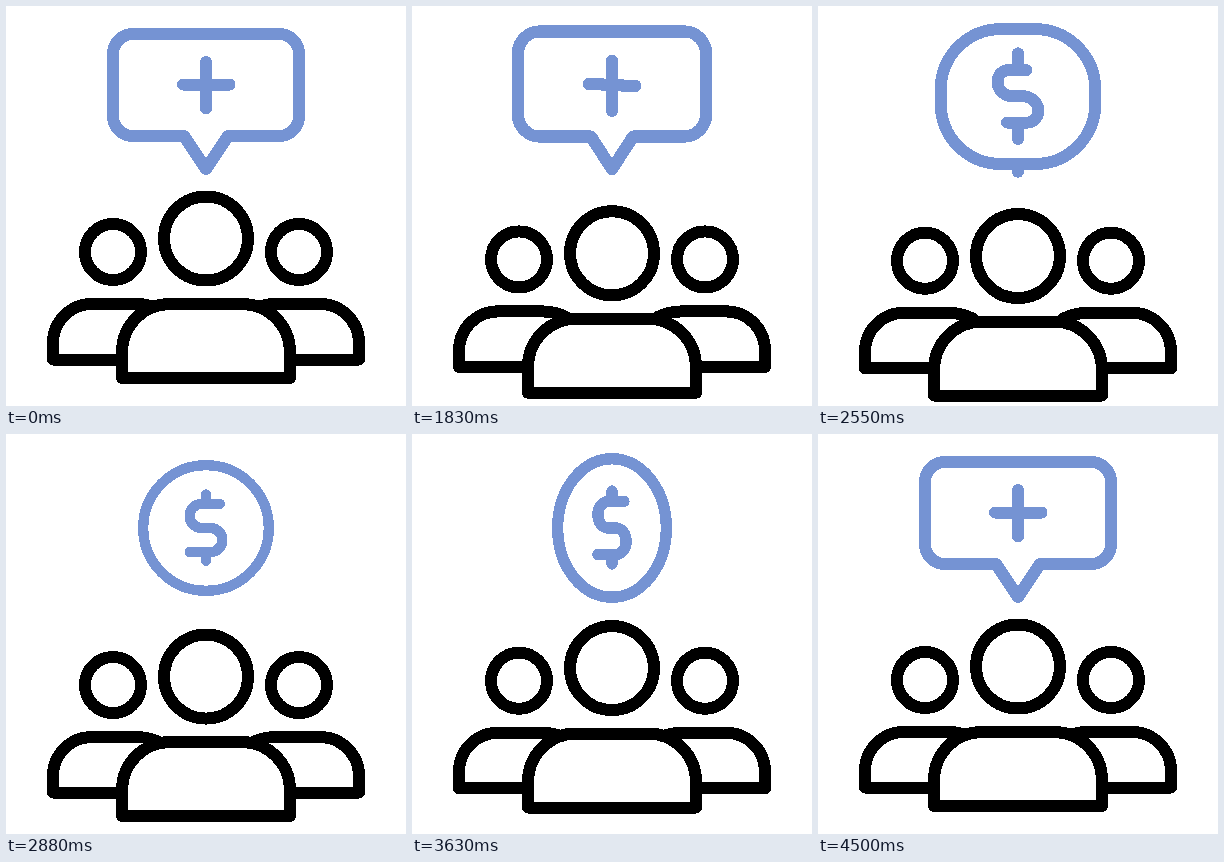
Write an HTML page that moves like this. It is 400 px wide and 400 px high and loops after 4.53 s.

```html
<!DOCTYPE html>
<html lang="en">
<head>
<meta charset="utf-8">
<title>Group idea</title>
<style>
  html, body { margin: 0; width: 100%; height: 100%; overflow: hidden; background: #fff; }
  svg { display: block; width: 100vw; height: 100vh; }
  g { stroke-linecap: round; stroke-linejoin: round; shape-rendering: crispEdges; }
</style>
</head>
<body>
<svg viewBox="0 0 400 400" stroke-width="12">
  <g id="sides" fill="none" stroke="#000">
    <g id="side">
      <circle cx="107" cy="246" r="28"/>
      <path d="M116 353.5H47V337A39 39 0 0 1 86 298H130Q143 298 155 304"/>
    </g>
    <use href="#side" transform="matrix(-1 0 0 1 400 0)"/>
  </g>
  <g id="middle" fill="#fff" stroke="#000">
    <circle cx="200" cy="232.5" r="42"/>
    <path d="M116 372V346A48 48 0 0 1 164 298H236A48 48 0 0 1 284 346V372Z"/>
  </g>
  <g id="sign" fill="none" stroke="#7593d3">
    <path id="frame"/>
    <path id="bar"/>
    <path id="stem"/>
  </g>
</svg>
<script>
const LOOP = 4530, STEP = 30;
const CX = 200, COIN_Y = 94, COIN_R = 73, TIP_Y = 163;
const byId = id => document.getElementById(id);
const mix = (a, b, p) => a + (b - a) * p;
const phase = (t, from, to) => Math.min(1, Math.max(0, (t - from) / (to - from)));
const smooth = u => u * u * (3 - 2 * u);
const easeOut = u => 1 - (1 - u) ** 3;
const hump = (t, from, to) => Math.sin(Math.PI * phase(t, from, to)) ** 2;

// People sink quickly, then rise back slowly.
const drop = t => 21 * (easeOut(phase(t, 1530, 2430)) - easeOut(phase(t, 2430, 4500)));

const zoom = t => 1 - .1 * hump(t, 1500, 1700) + .075 * hump(t, 1700, 2500)
  - .14 * hump(t, 2500, 3260) - .08 * hump(t, 3300, 4410);

// 0 is the bubble with a plus, 1 the coin with a dollar sign.
const morph = t => t > 1500 ? mix(.03, 1, phase(t, 1500, 2600) ** 6) : 0;

const turn = t => smooth(phase(t, 3300, 4410));

// Points along the dollar curve, matched to points along the plus bar.
const COUNT = 60;
const curve = document.createElementNS("http://www.w3.org/2000/svg", "path");
curve.setAttribute("d", "M216 66H195A14 14 0 0 0 195 94H205A14 14 0 0 1 205 122H181");
const dollar = Array.from({ length: COUNT + 1 }, (_, i) =>
  curve.getPointAtLength(curve.getTotalLength() * i / COUNT));

// Maps a point after scaling around (CX, pivot).
const placer = (sx, sy, pivot) => (x, y) =>
  `${(CX + (x - CX) * sx).toFixed(2)} ${(pivot + (y - pivot) * sy).toFixed(2)}`;

function framePath(p, sx, sy) {
  const at = placer(sx, sy, mix(TIP_Y, COIN_Y, p));
  const half = mix(93, COIN_R, p), r = mix(20, COIN_R, p);
  const top = mix(28, COIN_Y - COIN_R, p), bottom = mix(130, COIN_Y + COIN_R, p);
  const tail = 22 * (1 - p) ** 2, tip = mix(TIP_Y, COIN_Y + COIN_R, p);
  const left = CX - half, right = CX + half;
  const arc = (x, y) => `A${r * sx} ${r * sy} 0 0 1 ${at(x, y)}`;
  return `M${at(CX, tip)}L${at(CX - tail, bottom)}L${at(left + r, bottom)}`
    + arc(left, bottom - r) + `L${at(left, top + r)}` + arc(left + r, top)
    + `L${at(right - r, top)}` + arc(right, top + r)
    + `L${at(right, bottom - r)}` + arc(right - r, bottom)
    + `L${at(CX + tail, bottom)}Z`;
}

function drawSymbol(p, sx, sy) {
  const swell = 1 + 1.3 * p * (1 - p);
  const at = placer(sx * swell, sy * swell, mix(79, COIN_Y, p));
  const points = dollar.map(({ x, y }, i) =>
    at(mix(mix(177, 223.5, i / COUNT), x, p), mix(78.5, y, p)));
  const tick = (outer, inner) => `M${at(CX, outer)}L${at(CX, inner)}`;
  byId("bar").setAttribute("d", "M" + points.join("L"));
  byId("stem").setAttribute("d",
    tick(mix(56, 55, p), mix(79, 66, p)) + tick(mix(102.5, 132, p), mix(79, 122, p)));
}

function render(t) {
  const d = drop(t), flip = turn(t), facing = flip < .5;
  const p = facing ? morph(t) : 0;
  const s = facing ? zoom(t) : 1;
  const sx = s * Math.abs(Math.cos(Math.PI * flip));

  byId("frame").setAttribute("d", framePath(p, sx, s));
  drawSymbol(p, sx, s);
  byId("sign").setAttribute("stroke-width", 12 * s);
  byId("middle").setAttribute("transform", `translate(0 ${d})`);
  byId("sides").setAttribute("transform", `translate(0 ${d / 2})`);
}

const start = performance.now();
function tick(now) {
  const t = Math.max(0, now - start) % LOOP;
  render(Math.floor(t / STEP) * STEP);
  requestAnimationFrame(tick);
}
render(0);
requestAnimationFrame(tick);
</script>
</body>
</html>
```
